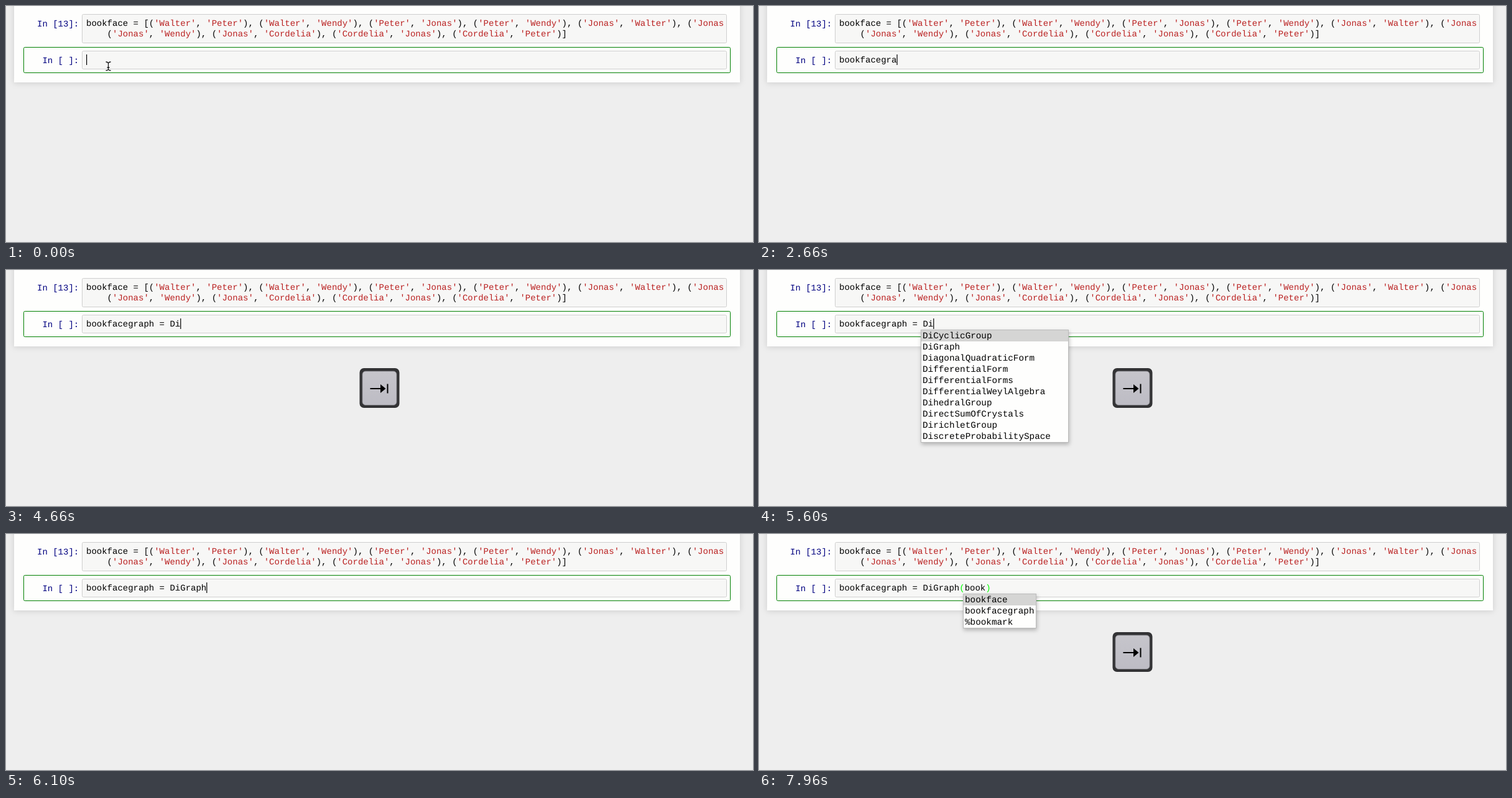
Animation, 1201 px wide and 380 px high, one loop 8000 ms. Source, as an HTML page:

```html
<!DOCTYPE html>
<html lang="en">
<head>
<meta charset="utf-8">
<title>Notebook tab completion</title>
<style>
  html, body { margin: 0; width: 100%; height: 100%; overflow: hidden; background: #eee; }
  svg { display: block; width: 1201px; height: 380px; }
  text { font: 14px "Liberation Mono", "Courier New", monospace; white-space: pre; text-rendering: geometricPrecision; }
  .page { fill: #fefefd; filter: drop-shadow(0 1px 5px rgba(87, 87, 87, .22)); }
  .input { fill: #f7f7f6; stroke: #cfcfcf; }
  .prompt { fill: #000080; }
  .string { fill: #ba2121; }
  .bracket { fill: #0f0; }
  .menu text { font-size: 14.3px; }
  .menu .box { fill: #fefefd; stroke: #bbb; filter: drop-shadow(1px 3px 3px rgba(0, 0, 0, .25)); }
  .menu .picked { fill: #d5d5d4; }
</style>
</head>
<body>
<svg viewBox="0 0 1201 380">
  <defs>
    <linearGradient id="cap" x2="0" y2="1">
      <stop stop-color="#c6c5cb"/>
      <stop offset="1" stop-color="#bdbcc4"/>
    </linearGradient>
  </defs>
  <rect class="page" x="13" y="-20" width="1167" height="143"/>
  <rect class="input" x="122.5" y="13.5" width="1036" height="46" rx="2"/>
  <rect x="28.5" y="66.5" width="1136" height="41" rx="2" fill="none" stroke="#008000"/>
  <rect class="input" x="122.5" y="72.5" width="1036" height="29" rx="2"/>
  <text class="prompt" x="50" y="33">In [13]:</text>
  <text class="prompt" x="58.4" y="92">In [ ]:</text>
  <text id="line1" x="129" y="32"></text>
  <text id="line2" x="129" y="49"></text>
  <text id="code" x="129" y="91"></text>
  <rect id="caret" y="78" width="1.2" height="17"/>
  <g id="pointer" fill="none">
    <path id="beam" d="M-4-7Q-1-7 0-5Q1-7 4-7M0-5V5M-4 7Q-1 7 0 5Q1 7 4 7M-2 2H2" stroke="#fff" stroke-width="2.6"/>
    <use href="#beam" style="stroke: #111"/>
    <path d="M-4-7Q-1-7 0-5Q1-7 4-7M0-5V5M-4 7Q-1 7 0 5Q1 7 4 7M-2 2H2" stroke="#111" stroke-width="1.3"/>
  </g>
  <g id="classMenu" class="menu"></g>
  <g id="nameMenu" class="menu"></g>
  <g id="tabKey">
    <rect x="568.5" y="158" width="64" height="64" rx="7" fill="#333335"/>
    <rect x="573" y="163" width="55" height="54.5" rx="5" fill="url(#cap)" stroke="#85848a" stroke-width=".8"/>
    <path d="M585.5 191H604M613.5 183.5V198.5" stroke="#000" stroke-width="2"/>
    <path d="M602 184L610.5 191L602 198Z"/>
  </g>
</svg>
<script>
const LOOP = 8000, LEFT = 129, ADVANCE = 8.4;
const $ = id => document.getElementById(id);
const show = (id, visible) => $(id).setAttribute("visibility", visible ? "visible" : "hidden");
const within = (t, from, to) => t >= from && t < to;

const source = "bookfacegraph = DiGraph(book";
// One time per typed character; the completion inserts five at once.
const keyTimes = [
  960, 1130, 1230, 1330, 1830, 1930, 2000, 2100,
  2400, 2560, 2660, 2760, 2800, 3030, 3360, 3430,
  4060, 4560, 6100, 6100, 6100, 6100, 6100, 6760,
  7130, 7200, 7330, 7430
];
const caretGaps = [[300, 800], [3960, 4060], [5060, 5600], [6600, 6760], [7960, 8000]];

const highlight = line => line.replace(/'[^']*'?/g, s =>
  /^'\w/.test(s) ? `<tspan class="string">${s}</tspan>` : s);
const bracket = s => `<tspan class="bracket">${s}</tspan>`;

$("line1").innerHTML = highlight("bookface = [('Walter', 'Peter'), ('Walter', 'Wendy'), ('Peter', 'Jonas'), ('Peter', 'Wendy'), ('Jonas', 'Walter'), ('Jonas");
$("line2").innerHTML = highlight("    ('Jonas', 'Wendy'), ('Jonas', 'Cordelia'), ('Cordelia', 'Jonas'), ('Cordelia', 'Peter')]");

function buildMenu(id, x, width, items) {
  const rows = items.map((item, i) => `<text x="${x + 3}" y="${110 + 18 * i}">${item}</text>`);
  $(id).innerHTML = `
    <rect class="box" x="${x + .5}" y="96.5" width="${width - 1}" height="${18 * items.length + 1}"/>
    <rect class="picked" x="${x + 1}" y="97" width="${width - 2}" height="18"/>` + rows.join("");
}

buildMenu("classMenu", 260, 238, [
  "DiCyclicGroup", "DiGraph", "DiagonalQuadraticForm", "DifferentialForm", "DifferentialForms",
  "DifferentialWeylAlgebra", "DihedralGroup", "DirectSumOfCrystals", "DirichletGroup",
  "DiscreteProbabilitySpace"
]);
buildMenu("nameMenu", 328, 118, ["bookface", "bookfacegraph", "%bookmark"]);
const classPick = $("classMenu").querySelector(".picked");

function draw(t) {
  const count = keyTimes.filter(time => time <= t).length;
  const typed = source.slice(0, count);
  $("code").innerHTML = typed.includes("(") ? typed.replace("(", bracket) + bracket(")") : typed;

  $("caret").setAttribute("x", LEFT + count * ADVANCE);
  show("caret", !caretGaps.some(([from, to]) => within(t, from, to)));

  const step = Math.max(0, Math.min(6, Math.floor((t - 260) / 34) + 1)) / 6;
  const ease = step * (2 - step);
  $("pointer").setAttribute("transform", `translate(${164.5 + 41 * ease} ${97 + 23 * ease})`);
  show("pointer", t < 1030);

  show("tabKey", within(t, 4660, 5660) || t >= 7430);
  show("classMenu", within(t, 4960, 6100));
  show("nameMenu", t >= 7760);
  classPick.setAttribute("y", t < 5760 ? 97 : 115);
}

const start = performance.now();
function frame() {
  draw((performance.now() - start) % LOOP);
  requestAnimationFrame(frame);
}
draw(0);
requestAnimationFrame(frame);
</script>
</body>
</html>
```
